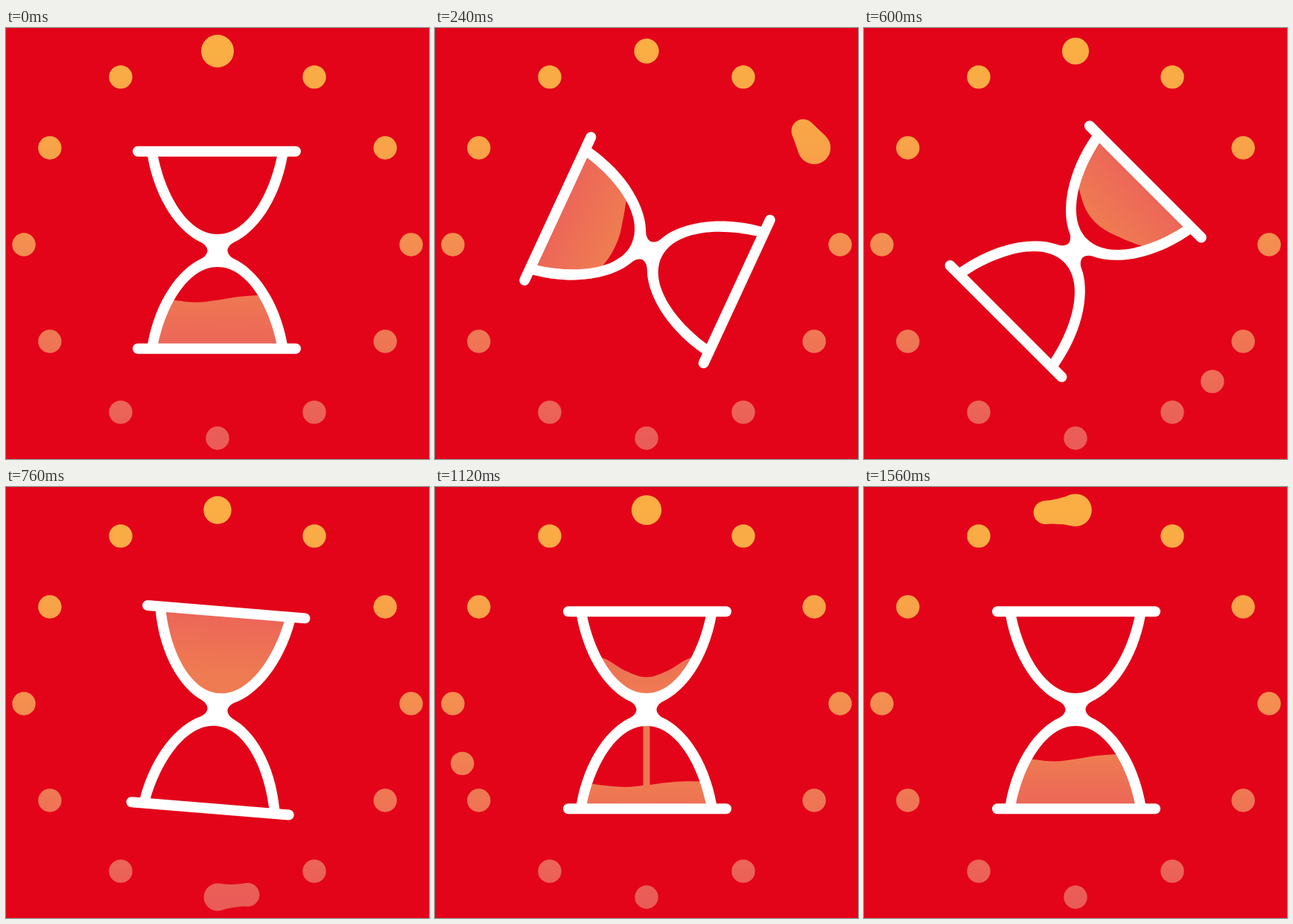
These frames come from a looping animation (568x579 px, 1.6 s). An HTML page with a canvas:

```html
<!DOCTYPE html>
<html lang="en">
<head>
<meta charset="utf-8">
<title>Hourglass loader</title>
<style>
  html, body { margin: 0; width: 100%; height: 100%; overflow: hidden; background: #e30419; }
  canvas { display: block; }
</style>
</head>
<body>
<canvas id="stage" width="568" height="579"></canvas>
<script>
const ctx = document.getElementById('stage').getContext('2d');
const LOOP = 1600, STEP = 40, TAU = Math.PI * 2;
const RING = { x: 284, y: 291, r: 260 };
const DOT = 15.7, BIG = 22;
const ORANGE = '#ef7b52', PINK = '#ec6658';

const clamp = v => Math.max(0, Math.min(1, v));
const mix = (a, b, k) => a + (b - a) * k;
const span = (t, from, to) => clamp((t - from) / (to - from));
const smooth = k => k * k * (3 - 2 * k);

// Cubic ease with zero slope at both ends and adjustable handles.
function ease(x, a, b) {
  let lo = 0, hi = 1;
  for (let i = 0; i < 24; i++) {
    const s = (lo + hi) / 2, q = 1 - s;
    if (3 * a * s * q * q + 3 * b * s * s * q + s ** 3 < x) lo = s; else hi = s;
  }
  return smooth(lo);
}

function gradient(y0, y1, colors) {
  const g = ctx.createLinearGradient(0, y0, 0, y1);
  colors.forEach((c, i) => g.addColorStop(i / (colors.length - 1), c));
  return g;
}

const ringFill = gradient(31, 551, ['#faae44', '#f8a348', '#f38e50', '#ef7654', '#ea5c58']);

// ---- ring of dots ----

const onRing = deg => {
  const a = deg * Math.PI / 180;
  return { x: RING.x + RING.r * Math.sin(a), y: RING.y - RING.r * Math.cos(a) };
};

function disc(p, r) {
  ctx.beginPath();
  ctx.arc(p.x, p.y, r, 0, TAU);
  ctx.fill();
}

function bridge(p, pr, q, qr) {
  const d = Math.hypot(q.x - p.x, q.y - p.y);
  if (d <= pr - qr || d > 48) return;
  const a = Math.atan2(q.y - p.y, q.x - p.x), b = Math.acos((pr - qr) / d);
  const pull = Math.max(0, d - 27) * 0.23;
  const at = (c, r, s) => ({ x: c.x + r * Math.cos(a + s * b), y: c.y + r * Math.sin(a + s * b) });
  const waist = (u, v, s) => [
    (u.x + v.x) / 2 - pull * Math.cos(a + s * b),
    (u.y + v.y) / 2 - pull * Math.sin(a + s * b)
  ];
  const p1 = at(p, pr, 1), q1 = at(q, qr, 1), p2 = at(p, pr, -1), q2 = at(q, qr, -1);
  ctx.beginPath();
  ctx.moveTo(p1.x, p1.y);
  ctx.quadraticCurveTo(...waist(p1, q1, 1), q1.x, q1.y);
  ctx.lineTo(q2.x, q2.y);
  ctx.quadraticCurveTo(...waist(p2, q2, -1), p2.x, p2.y);
  ctx.fill();
}

function drawRing(t) {
  ctx.fillStyle = ringFill;
  const angle = t / LOOP * 360, runner = onRing(angle);
  for (let i = 0; i < 12; i++) {
    const gap = Math.abs((angle - i * 30 + 540) % 360 - 180);
    let r = mix(DOT, BIG, clamp((11 - gap) / 4.6));
    if (i === 0) r = Math.max(r, mix(DOT, BIG, t / LOOP));
    const p = onRing(i * 30);
    disc(p, r);
    bridge(p, r, runner, DOT);
  }
  disc(runner, DOT);
}

// ---- hourglass: distances are measured from the neck ----

function glassOuter() {
  const p = new Path2D();
  p.moveTo(-94, -127);
  p.bezierCurveTo(-83, -65, -51, -24, -22, -11);
  p.bezierCurveTo(-16, -8, -13.5, -3, -13.5, 0);
  p.bezierCurveTo(-13.5, 3, -16, 8, -22, 11);
  p.bezierCurveTo(-51, 24, -83, 65, -94, 127);
  p.lineTo(94, 127);
  p.bezierCurveTo(83, 65, 51, 24, 22, 11);
  p.bezierCurveTo(16, 8, 13.5, 3, 13.5, 0);
  p.bezierCurveTo(13.5, -3, 16, -8, 22, -11);
  p.bezierCurveTo(51, -24, 83, -65, 94, -127);
  p.closePath();
  return p;
}

function addBulb(p, s) {
  p.moveTo(-80, 127 * s);
  p.bezierCurveTo(-69, 73 * s, -39, 22 * s, 0, 22 * s);
  p.bezierCurveTo(39, 22 * s, 69, 73 * s, 80, 127 * s);
  p.closePath();
}

const outer = glassOuter();
const glass = glassOuter();
addBulb(glass, 1);
addBulb(glass, -1);

// Surface heights at seven evenly spaced x positions.
const GRID = [-84, -56, -28, 0, 28, 56, 84];
const REST = 65;
const RIPPLE = [-2, 2, 4.5, 1.5, -3, -5, -4];
const SLOSH = [
  [0, RIPPLE.map(v => v + REST)],
  [240, [60, 54.5, 47, 41, 41.5, 48, 51]],
  [440, [63, 59, 53.5, 66, 68, 59, 54]],
  [600, [84, 66, 54, 46, 48.5, 62.5, 82]],
  [780, [0, 0, 0, 0, 0, 0, 0]]
];

function sloshAt(t) {
  const i = SLOSH.findIndex(k => k[0] > t);
  const [t0, a] = SLOSH[i - 1], [t1, b] = SLOSH[i];
  const k = span(t, t0, t1);
  return a.map((v, j) => mix(v, b[j], k));
}

function drainAt(t) {
  const early = span(t, 780, 960), late = span(t, 960, 1260);
  const edge = mix(mix(126, 114.5, early), 40, late);
  const mid = mix(mix(126, 72.5, early), 18, late);
  return GRID.map(x => mix(mid, edge, (1 - Math.cos(Math.PI * x / 80)) / 2));
}

function fillSand(ys, base, fill) {
  const n = ys.length, dx = GRID[1] - GRID[0];
  const slope = i => (ys[Math.min(n - 1, i + 1)] - ys[Math.max(0, i - 1)]) / 6;
  ctx.beginPath();
  ctx.moveTo(-100, base);
  ctx.lineTo(-100, ys[0]);
  ctx.lineTo(GRID[0], ys[0]);
  for (let i = 1; i < n; i++) {
    ctx.bezierCurveTo(GRID[i - 1] + dx / 3, ys[i - 1] + slope(i - 1),
      GRID[i] - dx / 3, ys[i] - slope(i), GRID[i], ys[i]);
  }
  ctx.lineTo(100, ys[n - 1]);
  ctx.lineTo(100, base);
  ctx.fillStyle = fill;
  ctx.fill();
}

function line(x0, y0, x1, y1, width, color) {
  ctx.lineWidth = width;
  ctx.lineCap = 'round';
  ctx.strokeStyle = color;
  ctx.beginPath();
  ctx.moveTo(x0, y0);
  ctx.lineTo(x1, y1);
  ctx.stroke();
}

function drawFallen(t) {
  const level = mix(126, REST, span(t, 800, 1560));
  const wave = span(t, 800, 1200);
  const tail = 24 + 0.9 * Math.max(0, t - 1280);
  const head = Math.min(level + 6, 20 + 110 * span(t, 780, 880));
  fillSand(RIPPLE.map(v => level + v * wave), 127, gradient(level, level + 65, [ORANGE, PINK]));
  if (tail < head) line(0, tail, 0, head, 9, '#ef7851');
}

function drawHourglass(t) {
  const turn = t < 600 ? 225 * ease(t / 600, 0.385, 0.335) : 225 - 45 * smooth(span(t, 600, 800));
  ctx.save();
  ctx.translate(284, 299);
  ctx.rotate(turn * Math.PI / 180);

  ctx.save();
  ctx.clip(outer);
  if (t < 780) {
    fillSand(sloshAt(t), 127, gradient(50, 126, [ORANGE, PINK]));
  } else {
    if (t < 1260) fillSand(drainAt(t), 0, gradient(22, 110, [ORANGE, PINK]));
    ctx.rotate(Math.PI);
    drawFallen(t);
  }
  ctx.restore();

  ctx.fillStyle = '#fff';
  ctx.fill(glass, 'evenodd');
  for (const y of [-133.2, 131.8]) line(-107, y, 105, y, 14, '#fff');
  ctx.restore();
}

function frame() {
  const t = Math.floor(performance.now() % LOOP / STEP) * STEP;
  ctx.fillStyle = '#e30419';
  ctx.fillRect(0, 0, 568, 579);
  drawRing(t);
  drawHourglass(t);
  requestAnimationFrame(frame);
}
frame();
</script>
</body>
</html>
```
